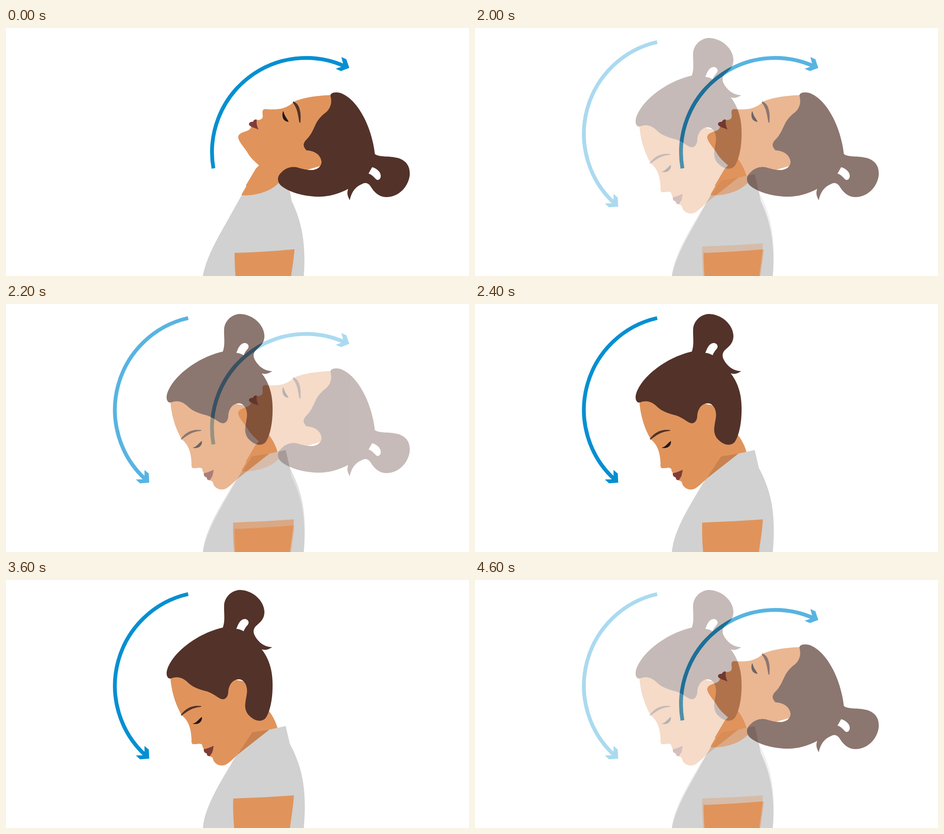
Recreate the animation shown at these times as an HTML page. Size 1023 by 547 pixels, loop 4.8 s.

```html
<!DOCTYPE html>
<html lang="en">
<head>
<meta charset="utf-8">
<title>Neck stretch</title>
<style>
  html, body { margin: 0; width: 100%; height: 100%; overflow: hidden; background: #fff; }
  svg { display: block; width: 1023px; height: 547px; }
  .paper { fill: #fff; }
  .skin { fill: #e0945c; }
  .shade { fill: #c98150; }
  .hair { fill: #533229; }
  .lips { fill: #813c37; }
  .eye { fill: #211719; }
  .shirt { fill: #d1d1d1; }
  .head { fill: #048fd2; }
  .arc { fill: none; stroke: #048fd2; stroke-width: 8.4; }
</style>
</head>
<body>
<svg viewBox="0 0 1023 547">
  <g id="back">
    <rect class="paper" width="1023" height="547"/>
    <path class="shirt" d="M521 368C560 371 590 355 602 340L627 358L631 381C655 430 663 480 658 547H435C439 522 453 490 470 459Z"/>
    <path class="skin" d="M505 496Q572 494 637.500 488C636 510 632 530 630 547H507Q505 522 505 496Z"/>
    <path class="skin" d="M720 148C680 149 654 155 637 162C625 173 612 182 575 179C567 178 566 183 567 191C569 201 562 203 554 203L541 217C541 223 536 226 529 228C517 232 513 235 513 242C515 253 529 266 536 279C543 289 550 295 559 303L552 310L530 347L531 349L521 366V369C560 371 592 355 604 340L640 320L710 300L730 180Z"/>
    <path class="hair" fill-rule="evenodd" d="M717 150C716 144 724 140 738 143C775 155 808 215 815 278C825 286 850 281 870 288C890 296 893 312 892 325C889 350 868 373 840 373C822 373 811 358 806 350C801 342 794 340 787 344C775 349 764 358 759.500 380C756 372 752 367 756 355C735 366 710 373 688 372C650 371 618 358 606 346C598 337 600 326 608 319C618 308 630 305 642 307C658 312 668 314 679 313C692 311 698 302 697 294C695 279 680 270 664 270C657 262 655 257 662 248C686 225 677 208 707 186C717 177 721 165 717 150ZM809 307C820 310 828 318 828 326C828 334 822 337 818 334C812 328 808 323 801 321Z"/>
    <path class="hair" d="M634 162C648 165 653 185 650.500 209L648 208C645 190 644 178 634 165Z"/>
    <path class="eye" d="M612 184C609 193 611 206 624.500 207C621 199 616 196 613 184Z"/>
    <path class="lips" d="M554 202C550 201 546 204 546 207C540 206 536 210 537 213C538 216 541 217 542 217C545 220 552 221 558 224C555 217 553 213 554 202Z"/>
    <path class="arc" d="M458.300 309.600A208 208 0 0 1 749 84.500"/>
    <path class="head" d="M741 64L752 69L758.500 88L740 95L728.500 90L746 83.500Z"/>
  </g>
  <g id="down">
    <rect class="paper" width="1023" height="547"/>
    <path class="skin" d="M363 214C366 250 375 275 388 298C405 312 409 330 410 352C409 361 412 363 417 362C425 362 432 359 434 365C434 370 437 371 437 373L449 389C460 390 456 397 461 402C467 409 478 412 488 406C497 400 505 391 512 386L600 327C597 315 590 300 581 289L560 230L400 200Z"/>
    <path class="shade" d="M511 386L544 336L583 330Z"/>
    <path class="shirt" d="M582 330L618 322L627 361C656 415 665 465 658 547H435C437 520 450 490 465 462C480 434 493 414 503 396L512 385Z"/>
    <path class="skin" d="M502 482Q568 480 636 475C635 500 630 525 627.500 547H504Q501 515 502 482Z"/>
    <path class="hair" fill-rule="evenodd" d="M365 217C358 219 354 212 355 203C362 165 420 118 479 105C485 90 481 70 482 55C483 38 498 22 518 22C545 23 570 45 571 70C571 88 560 94 551 103C544 112 547 120 555 131C563 141 574 148 588 148C582 152 575 156 565 153C580 172 590 198 589 235C589 268 581 295 574 304C567 313 553 312 543 304C530 295 527 283 529 270C530 260 534 248 532 238C530 226 522 219 515 219C502 219 492 230 491 247C491 258 484 264 478 263C470 262 460 251 445 246C430 242 415 238 404 228C392 216 380 211 365 217ZM509 108C513 97 518 86 528 86C536 87 538 94 534 99C530 103 527 108 525 113C520 110 515 108 509 108Z"/>
    <path class="hair" d="M386 298C396 283 412 275 432 278L430 280C412 281 400 290 388 299Z"/>
    <path class="eye" d="M433 302C434 314 424 320 412 317C422 315 426 306 433 302Z"/>
    <path class="lips" d="M437 373C447 372 454 367 459 366C457 374 457 381 453 384C452 389 447 390 444 386C445 384 443 382 440 381C437 379 437 376 437 373Z"/>
    <path class="arc" d="M402.500 31A207.500 207.500 0 0 0 308 386.500"/>
    <path class="head" d="M306 366L315.500 374L316.500 394L296 395.500L287 387L306 386.500Z"/>
  </g>
</svg>
<script>
  const LOOP = 4800;
  // [start ms, opacity of the lowered pose]
  const steps = [[0, 0], [2000, 1 / 3], [2200, 2 / 3], [2400, 1], [4400, 2 / 3], [4600, 1 / 3], [LOOP, 0]];
  const frames = steps.map(([t, opacity]) => ({ offset: t / LOOP, opacity, easing: 'step-end' }));
  document.getElementById('down').animate(frames, { duration: LOOP, iterations: Infinity });
</script>
</body>
</html>
```
